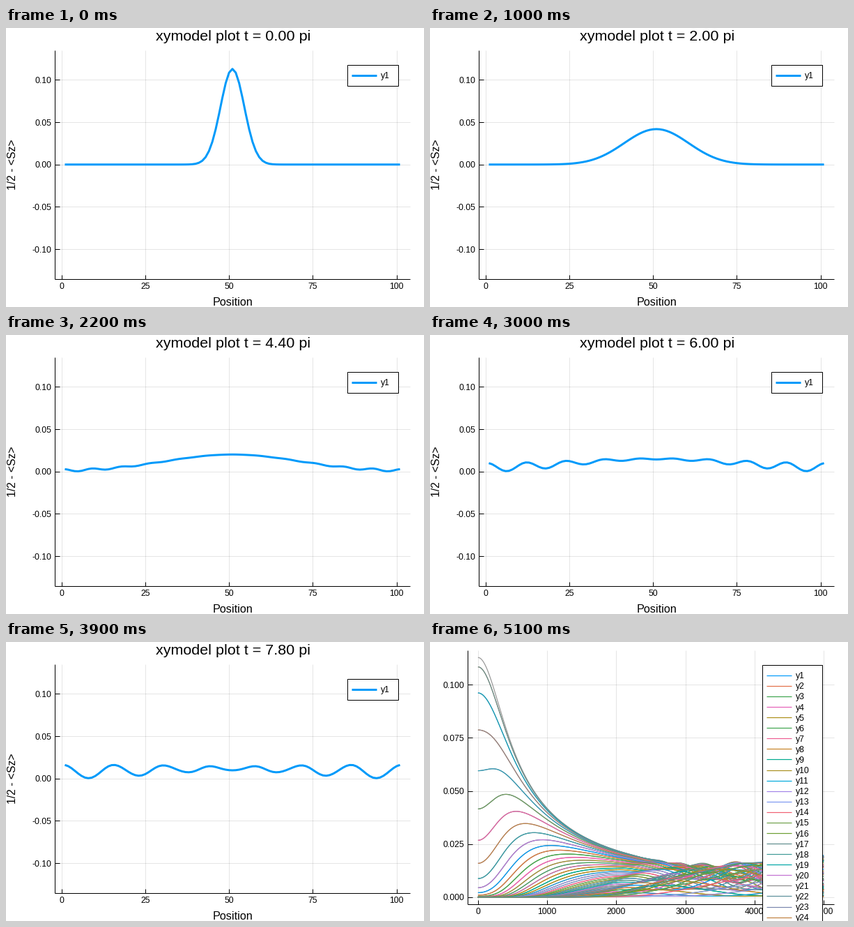
These frames come from a looping animation (600 by 400 pixels, 5200 ms). A matplotlib script:

```python
import numpy as np
import matplotlib.pyplot as plt
from matplotlib.animation import FuncAnimation
from matplotlib.patches import Rectangle

W, H, DPI = 600, 400, 100
FRAMES, INTERVAL = 52, 100
SITES, CENTER, SPREAD, HOP = 101, 51, 5.0, 10.0
STEPS = 5000
BLUE = "#009AFA"

PALETTE = [
    BLUE, "#E36F47", "#3EA44E", "#E560B8", "#AC8E18", "#3EA44E",
    "#ED5E93", "#C68225", "#00A98D", "#A8901E", "#00A9DC", "#A384E8",
    "#7C97F0", "#F06073", "#6FA04A", "#6C9F33", "#5F8C8C", "#3F9A96",
    "#00A6A6", "#C371D2", "#8C8C8C", "#5B8F9A", "#7A86AE", "#C08040",
]
MIDDLE = ["#969696", "#5B9696", "#2A9CA4", "#8F858F", "#2F9DB0",
          "#74995A", "#E560A4", "#B5893A", "#4E96A0", "#C371D2"]

plt.rcParams["font.family"] = "Liberation Sans"
fig = plt.figure(figsize=(W / DPI, H / DPI), dpi=DPI, facecolor="white")

site = np.arange(1, SITES + 1)
start = np.exp(-((site - CENTER) ** 2) / (2 * SPREAD ** 2))
modes = np.fft.fft(start / np.linalg.norm(start))
energy = HOP * np.cos(2 * np.pi * np.fft.fftfreq(SITES))


def density(t):
    """Magnon density on a periodic chain; one row per time."""
    phase = np.exp(-1j * np.outer(np.atleast_1d(t), energy))
    return np.abs(np.fft.ifft(modes * phase, axis=1)) ** 2


def pt(px):
    return px * 72 / DPI


def stage():
    ax = fig.add_axes([0, 0, 1, 1])
    ax.set_xlim(0, W)
    ax.set_ylim(H, 0)
    ax.axis("off")
    return ax


def line(ax, x, y, color="black", width=1, z=2, **kw):
    return ax.plot(x, y, color=color, lw=pt(width), zorder=z,
                   solid_capstyle="butt", solid_joinstyle="round", **kw)[0]


def text(ax, x, y, s, size=12.2, ha="center", z=3, **kw):
    return ax.text(x, y, s, fontsize=pt(size), ha=ha, va="baseline",
                   color="black", zorder=z, **kw)


def frame(ax, box, xlim, ylim, xticks, yticks, yfmt):
    """Draw grid, axes and ticks; return the data-to-pixel maps."""
    left, top, right, bottom = box

    def to_x(v):
        return left + (v - xlim[0]) * (right - left) / (xlim[1] - xlim[0])

    def to_y(v):
        return bottom - (v - ylim[0]) * (bottom - top) / (ylim[1] - ylim[0])

    for v in xticks:
        x = to_x(v)
        line(ax, [x, x], [top, bottom], alpha=0.1, z=1)
        line(ax, [x, x], [bottom - 6, bottom])
        text(ax, x, bottom + 14.5, str(v))
    for v in yticks:
        y = to_y(v)
        line(ax, [left, right], [y, y], alpha=0.1, z=1)
        line(ax, [left, left + 7], [y, y])
        text(ax, left - 4.7, y + 4.5, format(v, yfmt), ha="right")
    line(ax, [left, left], [top, bottom])
    line(ax, [left, right], [bottom, bottom])
    return to_x, to_y


def legend(ax, x, y, w, h, colors, first, gap, width):
    ax.add_patch(Rectangle((x, y), w, h, fc="white", ec="black",
                           lw=pt(1), zorder=5))
    for i, color in enumerate(colors):
        row = first + i * gap
        line(ax, [x + 6.5, x + 42], [row, row], color, width, z=6)
        text(ax, x + 48.5, row + 4.5, f"y{i + 1}", ha="left", z=6)


# Wave packet view
wave_ax = stage()
wx, wy = frame(wave_ax, (70, 31.5, 580, 360), (-2, 104), (-0.1352, 0.1352),
               range(0, 101, 25), [-0.10, -0.05, 0.0, 0.05, 0.10], ".2f")
text(wave_ax, 325.5, 398, "Position", 16.2)
text(wave_ax, 14, 196, "1/2 - <Sz>", 15.8, rotation=90,
     rotation_mode="anchor")
title = text(wave_ax, 326, 18.3, "", 21.5)
wave = line(wave_ax, wx(site), wy(np.zeros(SITES)), BLUE, 3, z=4)
legend(wave_ax, 489.5, 52.5, 73, 30, [BLUE], 67.5, 0, 3)

# History of every site
hist_ax = stage()
hx, hy = frame(hist_ax, (54, 12, 580, 376), (-149, 5151), (-0.00338, 0.1162),
               range(0, 5001, 1000), [0.0, 0.025, 0.05, 0.075, 0.1], ".3f")
step = np.arange(0, STEPS + 1, 5)
history = density(10 * np.pi * step / STEPS)
for i in range(SITES):
    if 50 <= i < 60:
        color = MIDDLE[i - 50]
    else:
        color = PALETTE[(i if i < 50 else i - 60) % len(PALETTE)]
    line(hist_ax, hx(step + 1), hy(history[:, i]), color, 1.2, z=4)
legend(hist_ax, 476.5, 32.5, 86, 1530, PALETTE, 47.8, 15.08, 1.2)


def update(n):
    last = n == FRAMES - 1
    wave_ax.set_visible(not last)
    hist_ax.set_visible(last)
    if not last:
        t = 0.2 * n
        title.set_text(f"xymodel plot t = {t:.2f} pi")
        wave.set_ydata(wy(density(t * np.pi)[0]))
    return []


anim = FuncAnimation(fig, update, frames=FRAMES, interval=INTERVAL,
                     init_func=lambda: update(0), repeat=True, repeat_delay=0)
plt.show()
```
